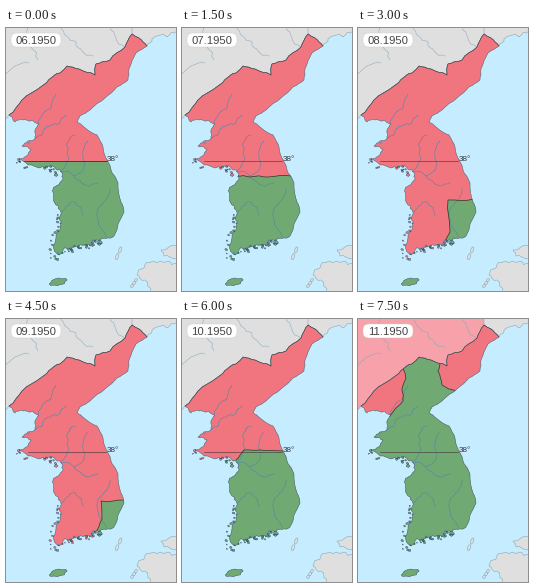
A matplotlib script for the animation above (8000 ms loop, 170x263 px).

```python
import random

import numpy as np
import matplotlib.pyplot as plt
from matplotlib.animation import FuncAnimation
from matplotlib.patches import FancyBboxPatch, PathPatch, Polygon
from matplotlib.path import Path

W, H = 170, 263
STEP, HOLD, LOOP = 500, 1500, 8000
SEA, LAND, RED, GREEN, PINK = "#c6ecff", "#dfdfdf", "#f0757f", "#71a973", "#f7a1aa"
RIVER, COAST, DARK = "#4f86a6", "#3a6478", "#4a3a3c"

rng = random.Random(38)


def rough(points, amount=0.12, rounds=2):
    """Split every edge and push the midpoints sideways."""
    pts = [np.array(p, float) for p in points]
    for _ in range(rounds):
        out = pts[:1]
        for a, b in zip(pts, pts[1:]):
            dx, dy = b - a
            out += [(a + b) / 2 + np.array([-dy, dx]) * rng.uniform(-amount, amount), b]
        pts = out
    return [tuple(p) for p in pts]


def blob(x, y, rx, ry, tilt=0.0, n=9):
    t = np.linspace(0, 2 * np.pi, n, endpoint=False)
    k = np.array([rng.uniform(0.8, 1.15) for _ in t])
    u, v = rx * k * np.cos(t), ry * k * np.sin(t)
    c, s = np.cos(tilt), np.sin(tilt)
    return list(zip(x + u * c - v * s, y + u * s + v * c))


def islets(shore, count, spread):
    """Scatter small islands along a shore."""
    rings = []
    for _ in range(count):
        x, y = rng.choice(shore)
        r = rng.uniform(0.5, 1.4)
        rings.append(blob(x - rng.uniform(0, spread), y + rng.uniform(0, spread),
                          r, r * 0.75, rng.uniform(-0.8, 0.8), 7))
    return rings


# Key points of the coast, clockwise from the north-western river mouth.
north = rough([(3, 87), (16, 72), (36, 58), (45, 50), (54, 45), (61, 38), (73, 41),
               (89, 47), (90, 36), (104, 32), (119, 19), (126, 6), (133, 10), (141, 18)], 0.1)
east = rough([(141, 18), (130, 25), (123, 41), (122, 52), (111, 59), (99, 70), (84, 82),
              (74, 88), (71, 94), (78, 99), (91, 107), (97, 119), (101, 132), (112, 155),
              (115, 174), (118, 184), (108, 208)], 0.07)
south = rough([(108, 208), (98, 210), (87, 212), (78, 217), (68, 219), (53, 227),
               (50, 207), (55, 186), (52, 178), (47, 161), (57, 151), (54, 142)], 0.25, 3)
west = rough([(54, 142), (47, 138), (33, 140), (13, 131), (25, 121), (16, 118),
              (29, 111), (33, 96), (20, 92), (9, 94), (3, 87)], 0.16, 3)

mainland = north + east[1:] + south[1:] + west[1:-1]
rings = [mainland, blob(52, 254, 8.3, 3.5, -0.22, 14), blob(94, 214, 2.8, 1.6, 0.5),
         blob(50, 147, 2, 1.3)]
rings += islets(south[8:60], 45, 6) + islets(west[:28], 14, 5)
korea = Path.make_compound_path(*[Path(r + r[:1], closed=True) for r in rings])

china = [(-1, -1), (133, -1)] + north[::-1] + [(-1, 92)]
russia = [(126, -1)] + north[-9:] + rough([(141, 18), (146, 11), (161, 9), (171, 3)], 0.25) + [(171, -1)]
honshu = rough([(171, 218), (155, 222), (158, 228), (171, 231)], 0.2)
kyushu = rough([(171, 236), (162, 233), (147, 233), (138, 240), (131, 247), (139, 252),
                (145, 264)], 0.25) + [(171, 264)]
islands = [blob(x, y, 1.5, 3.1, 0.35) for x, y in [(114, 222), (111, 229)]]
islands += [blob(130 - 2 * i, 252 + 3 * i, 2, 1.3, -0.8) for i in range(3)]

rivers = [
    [(22, 116), (36, 107), (44, 98), (60, 87)],
    [(32, 96), (45, 80), (50, 66)],
    [(55, 143), (63, 130), (61, 115), (69, 107)],
    [(55, 144), (68, 148), (82, 158), (92, 155)],
    [(68, 148), (79, 136), (82, 113)],
    [(54, 185), (69, 174), (77, 187)],
    [(100, 209), (92, 192), (101, 171), (104, 161)],
]
far_rivers = [
    [(22, -1), (24, 18), (32, 32)],
    [(-1, 49), (23, 35)],
    [(54, -1), (70, 14), (87, 28)],
    [(104, -1), (119, 19)],
]

# Each stage has its fronts; the last one has two.
nw_front = [(45, 50), (48, 59), (44, 70), (45, 82), (32, 97)]
ne_front = [(82, 44), (80, 52), (84, 66), (98, 72)]
fronts = [
    [[(11, 133), (102, 133)]],
    [[(55, 148), (68, 149), (86, 149), (109, 148)]],
    [[(87, 214), (92, 204), (90, 172), (116, 171)]],
    [[(90, 213), (96, 200), (95, 182), (118, 181)]],
    [[(54, 141), (62, 131), (78, 131), (102, 132)]],
    [nw_front, ne_front],
]
fronts = [[rough(line, 0.0 if k == 0 else 0.07) for line in stage]
          for k, stage in enumerate(fronts)]


def south_area(lines):
    """Everything south of the front, closed outside the peninsula."""
    edge = lines[0]
    if len(lines) > 1:
        edge = edge[::-1] + [(45, 30), (82, 30)] + lines[1]
    (x0, y0), (_, y1) = edge[0], edge[-1]
    if y0 > 200:
        return edge + [(130, y1), (130, 222), (x0, 222)]
    return [(-5, y0)] + edge + [(175, y1), (175, 240), (-5, 240)]


fig = plt.figure(figsize=((W + 0.01) / 72, (H + 0.01) / 72), dpi=72, facecolor=SEA)
ax = fig.add_axes([0, 0, 1, 1])
ax.set(xlim=(0, W), ylim=(H, 0))
ax.axis("off")


def land(points):
    return ax.add_patch(Polygon(points, fc=LAND, ec="#84a0ae", lw=0.5))


def stroke(points, color, lw, z):
    return ax.plot(*zip(*points), color=color, lw=lw, zorder=z)[0]


china_patch = land(china)
for shape in [russia, honshu, kyushu] + islands:
    land(shape)
for river in far_rivers:
    stroke(rough(river, 0.2, 3), "#84a9bc", 0.5, 1.5)

base = ax.add_patch(PathPatch(korea, fc=RED, ec="none", zorder=2))
jeju_box = [(40, 243), (65, 243), (65, 262), (40, 262)]
green, jeju = [ax.add_patch(Polygon(jeju_box, fc=GREEN, ec="none", zorder=3)) for _ in range(2)]
front_lines = [stroke(nw_front, "#333a32", 0.75, 6) for _ in range(2)]
river_lines = [stroke(rough(r, 0.2, 3), RIVER, 0.55, 4) for r in rivers]
for artist in [green, jeju] + front_lines + river_lines:
    artist.set_clip_path(base)
ax.add_patch(PathPatch(korea, fc="none", ec=COAST, lw=0.5, zorder=5))
stroke(north, DARK, 0.5, 6)

stroke([(22, 133), (99.5, 133)], "#4a3338", 0.6, 7)
ax.text(100.5, 132.8, "38°", family="Liberation Sans", size=8, color="#333333", zorder=8)
ax.add_patch(FancyBboxPatch((5, 5), 50, 14, boxstyle="round,pad=0,rounding_size=6",
                            fc="white", ec="#c8c8c8", lw=0.4, zorder=8))
label = ax.text(30, 16, "", family="Liberation Sans", size=11.3, color="#444444",
                ha="center", zorder=9)


def draw(i):
    k = i * STEP // HOLD
    lines = fronts[k]
    label.set_text(f"{6 + k:02d}.1950")
    green.set_xy(south_area(lines))
    china_patch.set_facecolor(PINK if k == 5 else LAND)
    for n, artist in enumerate(front_lines):
        artist.set_visible(n < len(lines))
        artist.set_data(*zip(*lines[min(n, len(lines) - 1)]))
    return [label, green, china_patch] + front_lines


anim = FuncAnimation(fig, draw, frames=LOOP // STEP, interval=STEP, repeat=True,
                     repeat_delay=0, blit=False)
plt.show()
```
